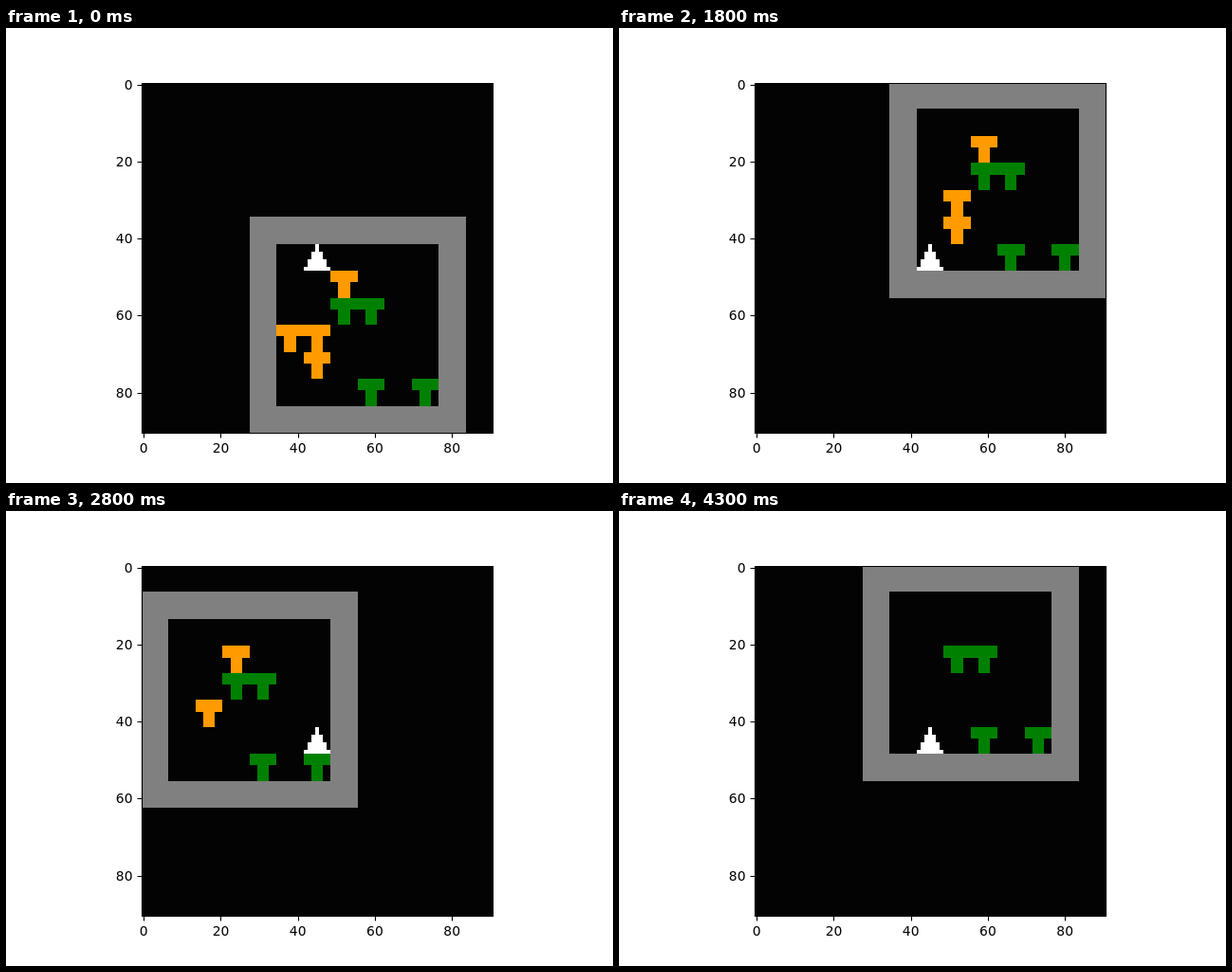
Animation of 640x480 px, one loop 4.4 s. Source, as an HTML page with a canvas:

```html
<!DOCTYPE html>
<html lang="en">
<head>
<meta charset="utf-8">
<title>Grid world</title>
<style>
  html, body { margin: 0; width: 100%; height: 100%; overflow: hidden; background: #fff; }
  canvas, svg { position: absolute; left: 0; top: 0; width: 640px; height: 480px; display: block; }
  text { font: 13.89px "DejaVu Sans", sans-serif; fill: #000; }
  path { fill: none; stroke: #000; stroke-width: 1.11; }
</style>
</head>
<body>
<canvas id="world" width="640" height="480"></canvas>
<svg id="axes" viewBox="0 0 640 480"></svg>
<script>
const LOOP = 4400, STEP = 100;
const CELL = 7, VIEW = 6, ROOM = 6;      // the agent stays in view cell (6, 6)
const LEFT = 143, TOP = 57, SCALE = 370 / 91;
const BLACK = '#030303', GRAY = '#808080', ORANGE = '#ff9a00', GREEN = '#008000';

// Room cells, counted from the inner top left corner
const fruit = [[2, 1], [0, 3], [1, 3], [1, 4]];
const trees = [[2, 2], [3, 2], [3, 5], [5, 5]];

// Start time and one move per step
const runs = [
  [100, 'DD'], [1300, 'LDDDUD'], [1900, 'URRRRR'], [2500, 'UUDD'],
  [3000, 'ULU'], [3400, 'ULLLLD'], [4000, 'RDDD']
];
const dirs = { U: [0, -1], D: [0, 1], L: [-1, 0], R: [1, 0] };

const path = [{ t: 0, x: 1, y: 0 }];
for (const [start, moves] of runs) {
  [...moves].forEach((m, i) => {
    const last = path[path.length - 1];
    path.push({ t: start + i * STEP, x: last.x + dirs[m][0], y: last.y + dirs[m][1] });
  });
}

const ctx = document.getElementById('world').getContext('2d');
ctx.beginPath();
ctx.rect(143, 58, 370, 369);
ctx.clip();

const edge = p => Math.round(p * SCALE);

// Rectangle in data units, snapped to whole pixels
function box(x, y, w, h, color) {
  const x0 = edge(x), y0 = edge(y);
  ctx.fillStyle = color;
  ctx.fillRect(LEFT + x0, TOP + y0, edge(x + w) - x0, edge(y + h) - y0);
}

function tee(cx, cy, color) {
  const x = cx * CELL, y = cy * CELL;
  box(x, y, 7, 3, color);
  box(x + 2, y + 3, 3, 4, color);
}

function agent() {
  const p = VIEW * CELL;
  for (let i = 0; i < 4; i++) box(p + 3 - i, p + 2 * i, 1 + 2 * i, i < 3 ? 2 : 1, '#fff');
}

function draw(time) {
  const seen = path.filter(p => p.t <= time);
  const { x, y } = seen[seen.length - 1];
  const ox = VIEW - x, oy = VIEW - y;
  const wall = (ROOM + 2) * CELL, inner = ROOM * CELL;

  box(0, 0, 91, 91, BLACK);
  box((ox - 1) * CELL, (oy - 1) * CELL, wall, wall, GRAY);
  box(ox * CELL, oy * CELL, inner, inner, BLACK);
  for (const [fx, fy] of fruit) {
    if (!seen.some(p => p.x === fx && p.y === fy)) tee(ox + fx, oy + fy, ORANGE);
  }
  for (const [tx, ty] of trees) tee(ox + tx, oy + ty, GREEN);
  agent();
}

function buildAxes() {
  let lines = 'M143.5 58.5H513.5V427.5H143.5Z', labels = '';
  for (let v = 0; v <= 80; v += 20) {
    const offset = (v + 0.5) * 369.6 / 91;
    const x = 143.2 + offset, y = 57.6 + offset;
    lines += `M${Math.round(x) + 0.5} 427.5v5M143.5 ${Math.round(y) + 0.5}h-5`;
    labels += `<text x="${x}" y="448" text-anchor="middle">${v}</text>` +
      `<text x="133.5" y="${Math.round(y + 5.07)}" text-anchor="end">${v}</text>`;
  }
  document.getElementById('axes').innerHTML = `<path d="${lines}"/>${labels}`;
}

buildAxes();
const begin = performance.now();
function tick() {
  draw((performance.now() - begin) % LOOP);
  requestAnimationFrame(tick);
}
tick();
</script>
</body>
</html>
```
